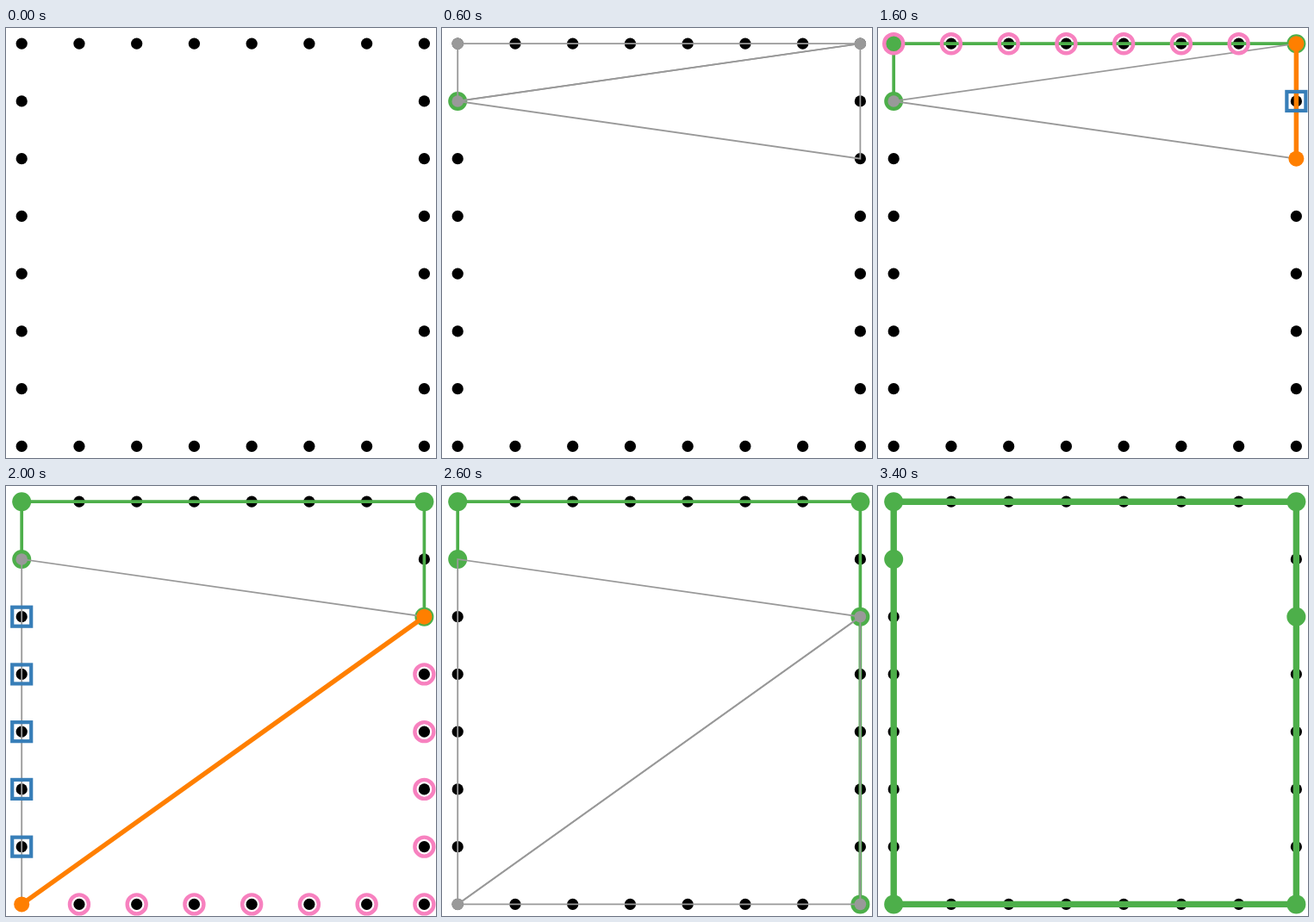
Write an HTML page with a canvas that moves like this. It is 499 by 499 pixels and loops after 7600 ms.

```html
<!DOCTYPE html>
<html lang="en">
<head>
<meta charset="utf-8">
<title>Quickhull</title>
<style>
html, body { margin: 0; width: 100%; height: 100%; overflow: hidden; background: #fff; }
canvas { display: block; }
</style>
</head>
<body>
<canvas id="stage" width="499" height="499"></canvas>
<script>
const ctx = document.getElementById('stage').getContext('2d');
const GREEN = '#4daf4a', GREY = '#999', ORANGE = '#ff7f00', BLUE = '#377eb8', PINK = '#f781bf';
const STEP = 200, LOOP = 7600, START = 18.2, GAP = 66.74;

// Points clockwise around the square; index 0 is the left side's second dot.
const point = i => {
  const n = (i + 27) % 28, side = Math.floor(n / 7), k = n % 7;
  const [x, y] = [[k, 0], [7, k], [7 - k, 7], [0, 7 - k]][side];
  return [START + x * GAP, START + y * GAP];
};
const hull = [0, 1, 8, 10, 15, 22];

// Each triangle: start, farthest point, end of a recursive call.
const upper = [0, 8, 10], corner = [0, 1, 8];
const lower = [10, 22, 28], lowerCorner = [10, 15, 22];

// [hull points found, call stack, edge being tested]
const steps = [
  [0, []],
  [1, [upper]],
  [1, [upper], 0],
  [1, [upper, corner]],
  [1, [upper, corner], 0],
  [2, [upper, corner]],
  [2, [upper, corner], 1],
  [3, [upper]],
  [3, [upper], 1],
  [4, [lower]],
  [4, [lower], 0],
  [4, [lower, lowerCorner]],
  [4, [lower, lowerCorner], 0],
  [5, [lower, lowerCorner]],
  [5, [lower, lowerCorner], 1],
  [6, [lower]],
  [6, [lower], 1],
  [6, [], undefined, true]
];

function dot(i, r, color) {
  ctx.fillStyle = color;
  ctx.beginPath();
  ctx.arc(...point(i), r, 0, 7);
  ctx.fill();
}

function path(ids, width, color, closed) {
  ctx.strokeStyle = color;
  ctx.lineWidth = width;
  ctx.beginPath();
  ids.forEach(i => ctx.lineTo(...point(i)));
  if (closed) ctx.closePath();
  ctx.stroke();
}

function ring(i) {
  ctx.strokeStyle = PINK;
  ctx.lineWidth = 4.4;
  ctx.beginPath();
  ctx.arc(...point(i), 11, 0, 7);
  ctx.stroke();
}

function box(i) {
  const [x, y] = point(i);
  ctx.strokeStyle = BLUE;
  ctx.lineWidth = 4.2;
  ctx.strokeRect(x - 11, y - 11, 22, 22);
}

function between(a, b, mark) {
  for (let i = a + 1; i < b; i++) mark(i);
}

function draw([found, stack, edge, done]) {
  ctx.fillStyle = '#fff';
  ctx.fillRect(0, 0, 499, 499);
  for (let i = 0; i < 28; i++) dot(i, 6.6, '#000');

  const chain = hull.slice(0, found);
  path(chain, done ? 7.4 : 3.7, GREEN, done);
  chain.forEach(i => dot(i, 11, GREEN));

  stack.forEach(t => path(t, 1.8, GREY, true));
  const top = stack[stack.length - 1];
  if (!top) return;
  top.forEach(i => dot(i, 6.8, GREY));

  if (edge === undefined) return;
  const ends = top.slice(edge, edge + 2);
  path(ends, 5.5, ORANGE);
  ends.forEach(i => dot(i, 9, ORANGE));
  between(top[0], top[1], ring);
  between(top[1], top[2], box);
}

function tick(now) {
  const n = Math.floor(now % LOOP / STEP);
  draw(steps[Math.min(n, steps.length - 1)]);
  requestAnimationFrame(tick);
}
tick(performance.now());
</script>
</body>
</html>
```
